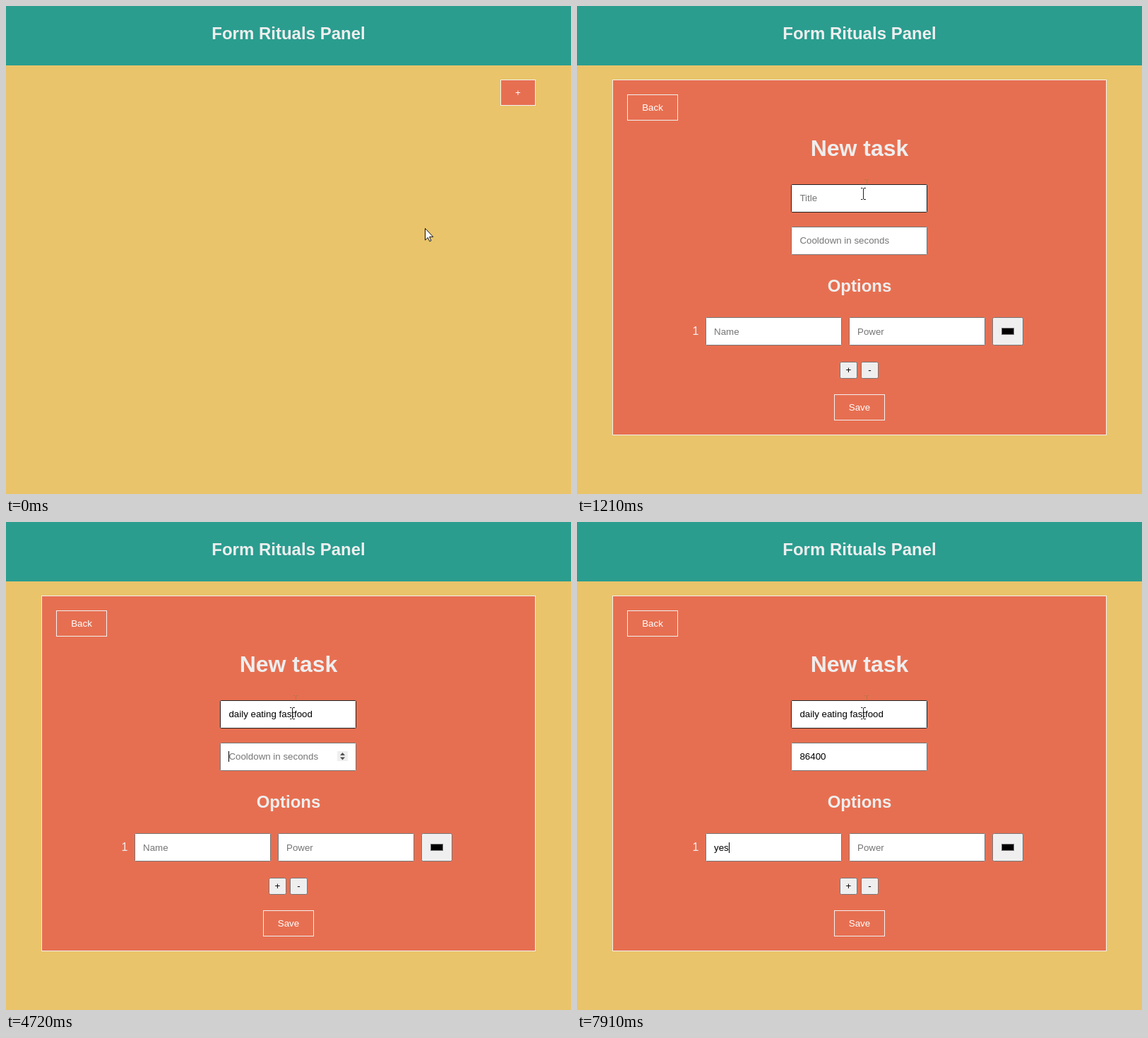
Write an HTML page that moves like this. It is 800x690 px and loops after 8 s.

```html
<!DOCTYPE html>
<html lang="en">
<head>
<meta charset="utf-8">
<title>New task form</title>
<style>
  html, body { margin: 0; width: 100%; height: 100%; overflow: hidden; background: #e9c46a; }
  svg { display: block; width: 800px; height: 690px; }
  text { font: 13.333px "Liberation Sans", Arial, sans-serif; fill: #fff; white-space: pre; }
  .heading { font-size: 24px; font-weight: bold; fill: #eee; }
  .middle { text-anchor: middle; }
  .outlined { fill: #e76f51; stroke: #f1f1f1; }
  .field { fill: #fff; stroke: #767676; }
  .control { fill: #efefef; stroke: #767676; }
  .ink { fill: #000; }
  text.empty { fill: #757575; }
  #beam, #trail { fill: none; stroke: #222; }
  #trail { stroke: #b8743f; }
</style>
</head>
<body>
<svg viewBox="0 0 800 690">
  <rect width="800" height="690" fill="#e9c46a"/>
  <rect width="800" height="84" fill="#2a9d8f"/>
  <text class="heading middle" x="400" y="47">Form Rituals Panel</text>

  <g id="home">
    <rect id="add" class="outlined" x="700.5" y="104.5" width="49" height="36"/>
    <text class="middle" x="725" y="127">+</text>
  </g>

  <g id="form">
    <rect class="outlined" x="50.5" y="104.5" width="699" height="502"/>
    <rect class="outlined" x="71.5" y="125.5" width="71" height="36"/>
    <text class="middle" x="107" y="148">Back</text>
    <text class="heading middle" x="400" y="212" style="font-size:32px">New task</text>
    <rect id="titleBox" class="field" x="303.5" y="252.5" width="192" height="39" rx="1"/>
    <rect class="field" x="303.5" y="312.5" width="192" height="39" rx="1"/>
    <text id="title" x="315.4" y="276"></text>
    <path id="squiggle" fill="none" stroke="#e02020"/>
    <text id="cooldown" x="315.4" y="336"></text>
    <g id="spinner">
      <rect x="469" y="324" width="15" height="14" fill="#efefef"/>
      <path d="M473 330L476.5 326L480 330ZM473 332.500H480L476.500 336.500Z" fill="#505050"/>
    </g>
    <text class="heading middle" x="400" y="404">Options</text>
    <text x="163.500" y="465" style="font-size:16px;fill:#eee">1</text>
    <rect class="field" x="182.5" y="440.5" width="192" height="39" rx="1"/>
    <rect class="field" x="385.5" y="440.5" width="192" height="39" rx="1"/>
    <text id="name" x="194" y="465"></text>
    <text class="empty" x="397" y="465">Power</text>
    <rect class="control" x="588.5" y="440.5" width="43" height="39" rx="2"/>
    <rect x="601.5" y="455.5" width="17" height="9" stroke="#767676"/>
    <rect class="control" x="372.5" y="503.5" width="24" height="23" rx="2"/>
    <rect class="control" x="402.5" y="503.5" width="24" height="23" rx="2"/>
    <text class="ink middle" x="384.5" y="519">+</text>
    <text class="ink middle" x="414.5" y="519">-</text>
    <rect class="outlined" x="364.5" y="549.5" width="71" height="36"/>
    <text class="middle" x="400" y="572">Save</text>
    <rect id="caret" class="ink" width="1" height="15"/>
  </g>

  <g id="status">
    <path id="bubble" fill="#dee1e6" stroke="#bfae85"/>
    <text x="5" y="686" style="font:11px 'Open Sans',sans-serif;fill:#55585c">testbench:4100/add/</text>
  </g>

  <path id="trail" d="M407 245.5H409.500M411 245.5H413.500M410.500 246V251"/>
  <path id="beam" d="M-3 -7.5H-.5M1 -7.5H4M.5 -7V8M-3 8.5H-.5M1 8.5H4"/>
  <path id="arrow" d="M.5 .5V17L4.300 13.400L6.800 18.700L9 17.700L6.600 12.400H11.800Z" fill="#fff" stroke="#111"/>
</svg>
<script>
const LOOP = 8000;
const PAGE_AT = 670, BEAM_AT = 1130, FOCUS_AT = 1440, TAB1_AT = 4720, TAB2_AT = 7060;
const START = [593, 314], BUTTON = [731, 129], FIELD = [411, 238];

const $ = id => document.getElementById(id);
const show = (id, on) => $(id).setAttribute("visibility", on ? "visible" : "hidden");
const place = (id, [x, y]) => $(id).setAttribute("transform", `translate(${x} ${y})`);
const clamp = v => Math.min(1, Math.max(0, v));
const smooth = v => v * v * (3 - 2 * v);
const mix = (a, b, v) => a.map((n, i) => Math.round(n + (b[i] - n) * v));

// Each run is [text, time of first key, time between keys].
const typed = (t, runs) => runs.map(([text, from, gap]) =>
  text.slice(0, Math.max(0, Math.floor((t - from) / gap) + 1))).join("");

const titleRuns = [["daily ea", 1760, 144], ["ting ", 2920, 103], ["fast", 3540, 103], ["food", 4090, 157]];
const cooldownRuns = [["86", 5960, 90], ["400", 6360, 110]];
const nameRuns = [["yes", 7590, 160]];

function fill(id, value, placeholder) {
  const el = $(id);
  const text = value || placeholder;
  if (el.textContent !== text) el.textContent = text;
  el.setAttribute("class", value ? "ink" : "empty");
  return value ? el.getComputedTextLength() : 0;
}

function drawPointer(t) {
  const step = Math.floor((t - 70) / 74);
  const tip = t < PAGE_AT
    ? mix(START, BUTTON, smooth(clamp((step + 1) / 8)))
    : mix(BUTTON, FIELD, smooth(clamp((step - 8) / 5)));
  place("arrow", tip);
  place("beam", t < 1210 ? [410, 254] : t < 1290 ? [405, 265] : [405, 270]);
  show("arrow", t < BEAM_AT);
  show("beam", t >= BEAM_AT);
  show("trail", t >= 1210);
  const hovered = tip[0] >= 700 && tip[1] < 141;
  $("add").style.fill = hovered ? "#264653" : "";
  $("titleBox").style.stroke = t >= BEAM_AT ? "#222" : "";
}

function drawStatus(t) {
  const right = t < PAGE_AT ? 119.5 : 264.5;
  $("bubble").setAttribute("d", `M-1 670.5H${right - 4}q4 0 4 4V691H-1Z`);
  $("status").setAttribute("opacity", t < PAGE_AT ? 0.85 : t < BEAM_AT ? 1 : 0.5);
  show("status", t >= 588 && t < 1210);
}

function drawFields(t) {
  const widths = [
    fill("title", typed(t, titleRuns), "Title"),
    fill("cooldown", typed(t, cooldownRuns), "Cooldown in seconds"),
    fill("name", typed(t, nameRuns), "Name")
  ];
  const focus = t < TAB1_AT ? 0 : t < TAB2_AT ? 1 : 2;
  const left = focus === 2 ? 194 : 315.4;
  $("caret").setAttribute("x", Math.round(left + widths[focus]));
  $("caret").setAttribute("y", [264, 324, 453][focus]);
  show("caret", t >= FOCUS_AT && !(t >= 5270 && t < 5740));
  show("spinner", focus === 1);
  show("squiggle", t >= 3435 && t < TAB1_AT);
}

function frame(now) {
  const t = now % LOOP;
  $("home").style.display = t < PAGE_AT ? "" : "none";
  $("form").style.display = t < PAGE_AT ? "none" : "";
  drawPointer(t);
  drawStatus(t);
  if (t >= PAGE_AT) drawFields(t);
  else ["caret", "spinner", "squiggle"].forEach(id => show(id, false));
  requestAnimationFrame(frame);
}

$("squiggle").setAttribute("d", "M347 278.5" + "l2 -1.5l2 1.5".repeat(9));
requestAnimationFrame(() => frame(performance.now()));
</script>
</body>
</html>
```
